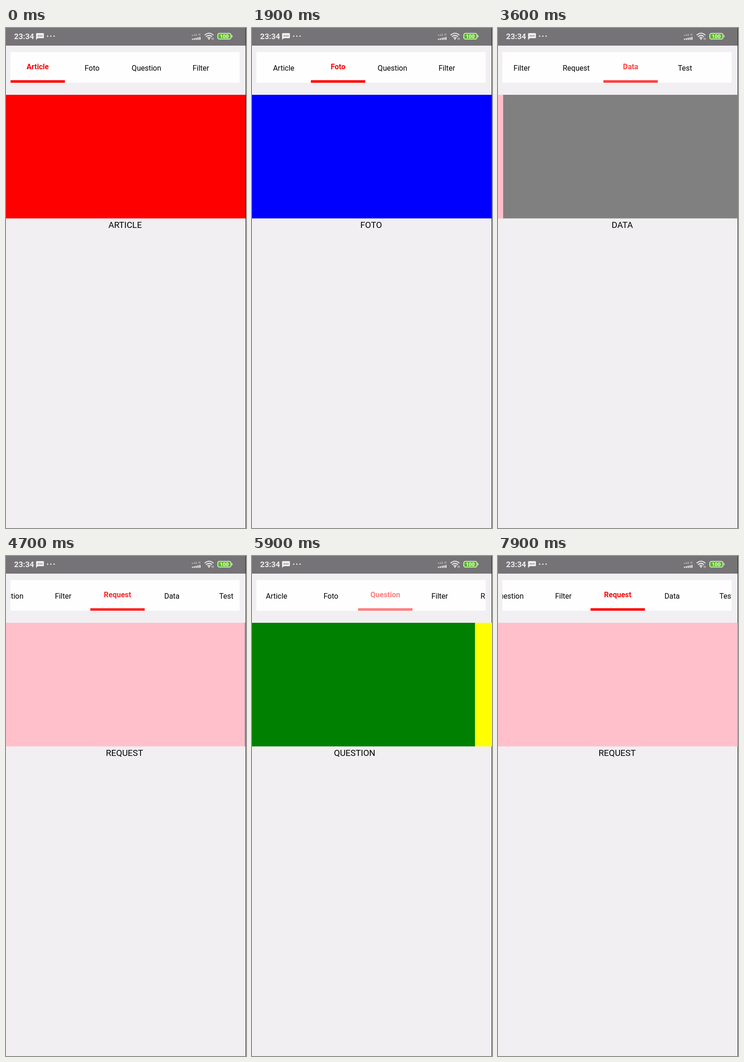
Animation, 519 px wide and 1078 px high, one loop 8000 ms. Source, as an HTML page:

```html
<!DOCTYPE html>
<html lang="en">
<head>
<meta charset="utf-8">
<title>Tab pager</title>
<style>
html, body { margin: 0; width: 100%; height: 100%; overflow: hidden; background: #f1eff2; }
svg { display: block; width: 519px; height: 1078px; font-family: Roboto, sans-serif; }
.tab { font-size: 16px; text-anchor: middle; }
.title { font-size: 18.8px; text-anchor: middle; }
#active { fill: #f00; font-weight: 700; }
</style>
</head>
<body>
<svg viewBox="0 0 519 1078">
  <clipPath id="bar"><rect x="9.5" y="52" width="495.5" height="66"/></clipPath>
  <rect width="519" height="1078" fill="#f1eff2"/>
  <rect width="519" height="38" fill="#757375"/>
  <rect x="518" width="1" height="1078" fill="#222"/>

  <g id="status" fill="#ededed">
    <text x="17.5" y="24" font-size="16.8" font-weight="700">23:34</text>
    <path d="M66.500 11H80.500Q82 11 82 12.500V20.500Q82 22 80.500 22H69L65 25.500V12.500Q65 11 66.500 11Z"/>
    <g fill="#757375"><circle cx="70" cy="17" r="1.200"/><circle cx="73.700" cy="17" r="1.200"/><circle cx="77.400" cy="17" r="1.200"/></g>
    <circle cx="90" cy="17.500" r="1.500"/><circle cx="97" cy="17.500" r="1.500"/><circle cx="104" cy="17.500" r="1.500"/>
    <g id="signal"></g>
    <path d="M416 12l4.500 4.500m0-4.500l-4.500 4.500" stroke="#aaa8aa" stroke-width="1.200"/>
    <g fill="none" stroke="#ededed" stroke-width="2">
      <path d="M429.500 15.500Q439 7 448.500 15.500M432.500 18.800Q439 13 445.500 18.800M435.500 21.800Q439 18.800 442.500 21.800"/>
      <path d="M445.700 21v4.500m2.600-4.500v4.500" stroke-width="1"/>
    </g>
    <circle cx="439" cy="23.500" r="1.700"/>
    <rect x="458" y="11.500" width="28.500" height="12.500" rx="3.500" fill="#58b626" stroke="#ededed" stroke-width="1.700"/>
    <rect x="488" y="15.500" width="1.700" height="4.500" rx=".8"/>
    <text x="472" y="22" font-size="11" font-weight="700" text-anchor="middle" fill="#fff">100</text>
  </g>

  <rect x="9.5" y="52" width="495.5" height="66" fill="#fffeff"/>
  <g clip-path="url(#bar)">
    <g id="tabs">
      <g id="active">
        <rect y="112.500" width="117.600" height="5.500"/>
        <text class="tab" x="58.800" y="88.500"></text>
      </g>
    </g>
  </g>
  <g id="pages"></g>
  <circle id="touch" cy="615" r="14.500" fill="#fff" fill-opacity=".7" stroke="#cdc9e0" stroke-width="2"/>
</svg>
<script>
const LOOP = 8000, TAB = 117.6, LEFT = 9.7, PAGE = 518;
const names = ['Article', 'Foto', 'Question', 'Filter', 'Request', 'Data', 'Test'];
const colors = ['#f00', '#00f', '#008000', '#ff0', '#ffc0cb', '#808080'];

// Page moves and tab changes: [start, duration, tab]
const pageMoves = [[1320, 400, 1], [1920, 360, 2], [2280, 380, 4], [3312, 400, 5], [4358, 400, 4],
  [4820, 400, 3], [5665, 400, 2], [6210, 400, 3], [7230, 450, 4]];
const tabMoves = [[1320, 400, 1], [1920, 360, 2], [2280, 380, 4], [3300, 400, 5], [4357, 400, 4],
  [4820, 400, 3], [5700, 400, 2], [6210, 400, 3], [7510, 400, 4]];
// Tab bar scrolling: [start, duration, offset]
const centred = i => Math.max(0, (i - 1.608) * TAB);
const scrolls = [[250, 450, 130], [850, 400, 0], [1920, 360, centred(2)], [2280, 380, centred(4)],
  [3300, 400, centred(5)], [4357, 400, centred(4)], [4820, 400, centred(3)], [5280, 350, 0],
  [5767, 400, centred(2)], [6210, 400, centred(3)], [6640, 380, 223.4], [7510, 400, centred(4)]];

const $ = id => document.getElementById(id);
const clamp = x => Math.min(1, Math.max(0, x));
const linear = x => x;
const easeOut = x => 1 - (1 - x) ** 3;

function add(parent, tag, attrs, text = '') {
  const el = document.createElementNS('http://www.w3.org/2000/svg', tag);
  for (const key in attrs) el.setAttribute(key, attrs[key]);
  el.textContent = text;
  parent.append(el);
  return el;
}

function valueAt(moves, t, ease) {
  let value = 0;
  for (const [start, duration, to] of moves)
    value += (to - value) * ease(clamp((t - start) / duration));
  return value;
}

const labels = names.map((name, i) =>
  add($('tabs'), 'text', { class: 'tab', x: (i + 0.5) * TAB, y: 91.5 }, name));

colors.forEach((fill, i) => {
  add($('pages'), 'rect', { x: i * PAGE, y: 144, width: PAGE + 0.5, height: 266.5, fill });
  add($('pages'), 'text', { class: 'title', x: i * PAGE + 257.7, y: 431 }, names[i].toUpperCase());
});

for (let i = 0; i < 5; i++) {
  const x = 402 + i * 4, h = 2.5 + i * 0.9;
  add($('signal'), 'rect', { x, y: 25.5 - h, width: 2.6, height: h });
  if (i < 3) add($('signal'), 'rect', { x, y: 17 - h, width: 2.6, height: h, fill: '#aaa8aa' });
}

const activeText = $('active').querySelector('text');

function draw(t) {
  const [start, duration, tab] = tabMoves.filter(m => m[0] <= t).pop() || [-1000, 400, 0];
  const move = (el, x) => el.setAttribute('transform', `translate(${x})`);
  move($('tabs'), LEFT - valueAt(scrolls, t, linear));
  move($('pages'), -PAGE * valueAt(pageMoves, t, easeOut));
  move($('active'), tab * TAB);
  $('active').setAttribute('opacity', clamp((t - start) / duration));
  activeText.textContent = names[tab];
  labels.forEach((label, i) => label.setAttribute('visibility', i === tab ? 'hidden' : 'visible'));

  $('touch').setAttribute('cx', 400 - 250 * clamp((t - 7220) / 200));
  $('touch').setAttribute('visibility', t >= 7150 && t < 7420 ? 'visible' : 'hidden');
}

const origin = performance.now();
function frame() {
  draw((performance.now() - origin) % LOOP);
  requestAnimationFrame(frame);
}
frame();
</script>
</body>
</html>
```
